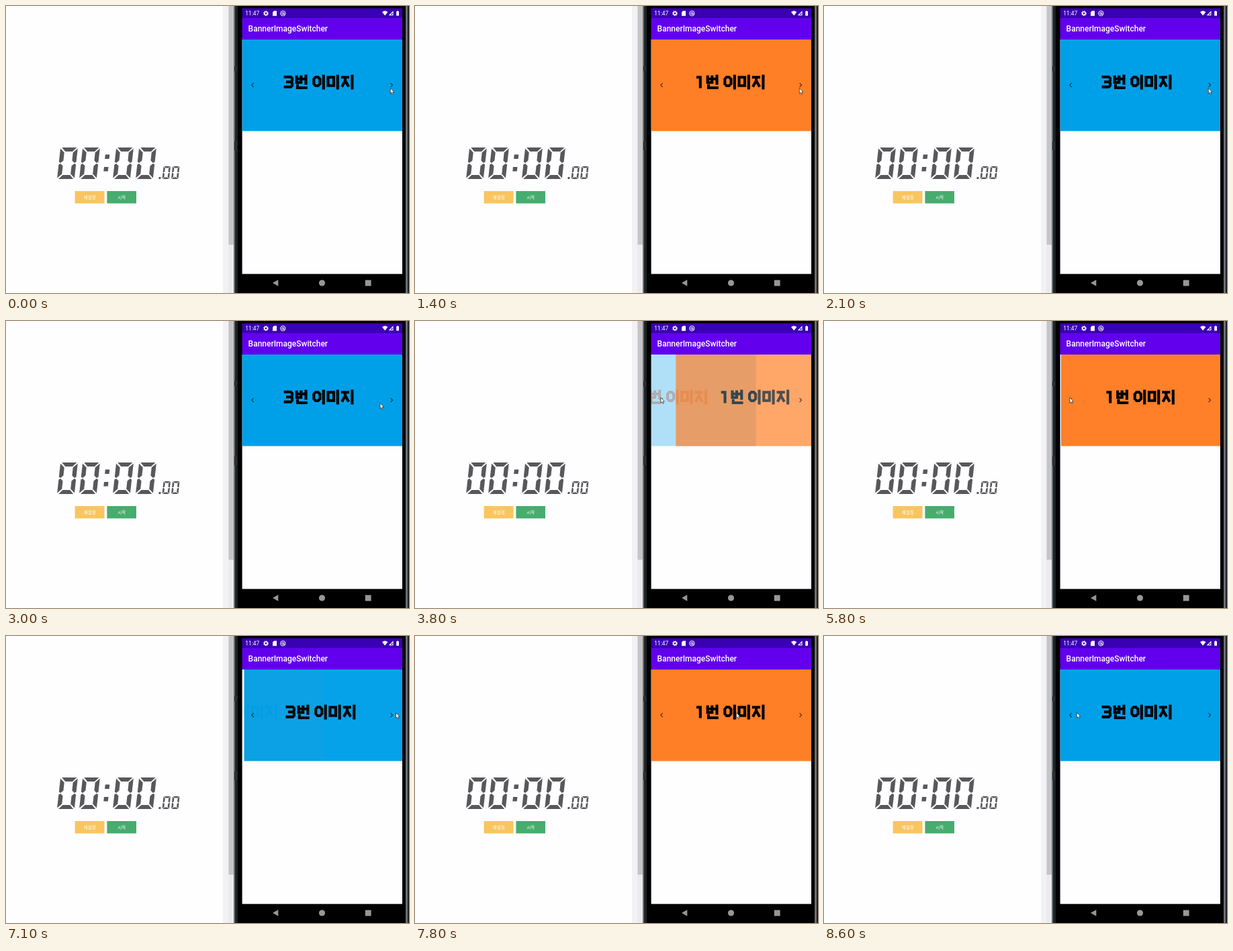
Recreate the animation shown at these times as an HTML page. Size 600 by 428 pixels, loop 8700 ms.

```html
<!DOCTYPE html>
<html lang="ko">
<head>
<meta charset="utf-8">
<title>Banner switcher</title>
<style>
  html, body { margin: 0; width: 100%; height: 100%; overflow: hidden; background: #fefdff; }
  svg { display: block; width: 600px; height: 428px; }
  .ui { font-family: Roboto, "Noto Sans", sans-serif; fill: #fff; }
  .ko { font-family: "Noto Sans CJK KR", "Noto Sans CJK", sans-serif; font-size: 6.5px; fill: #fff; text-anchor: middle; }
  .letters { fill: none; stroke: #000; stroke-width: 4.1; }
  .chevron { fill: none; stroke: #000; stroke-opacity: .6; stroke-width: 1.2; }
</style>
</head>
<body>
<svg viewBox="0 0 600 428">
  <defs>
    <clipPath id="frame"><rect x="351.6" y="50" width="238.4" height="136.4"/></clipPath>
    <g id="zero">
      <path d="M2 0H23.5L18 6H7.5Z"/>
      <path d="M0 1.5L6.2 7.5V19.5L2.5 23L0 21.5Z"/>
      <path d="M25 1.5L18.8 7.5V19.5L22.5 23L25 21.5Z"/>
      <path d="M0 25.5L2.5 24L6.2 27.5V39.5L0 45.5Z"/>
      <path d="M25 25.5L22.5 24L18.8 27.5V39.5L25 45.5Z"/>
      <path d="M2 47H23.5L18 41H7.5Z"/>
    </g>
    <!-- the word shared by every banner -->
    <path id="word" d="M19.7 1.5V12H26.3V1.5M19.7 6.8H26.3M26.3 6.8H33.5M33.5 .5V15.5M21 14.5V20H35.8
      M48 4H51.5L54.5 7V14L51.5 17H48L45.3 14V7ZM59.8 .5V22.5
      M66.5 4.3H75V16.7H66.5ZM80.8 .5V22.5
      M85.8 4.3H98M92 4.3V9.5L87 18.5M92 9.5L97.2 18.5M102.4 .5V22.5"/>
  </defs>

  <!-- stopwatch page -->
  <rect width="340" height="428" fill="#fefdff"/>
  <g id="clock" fill="#58575a"></g>
  <rect x="102.6" y="276" width="43.9" height="18.4" fill="#f9c55f"/>
  <rect x="150.4" y="276" width="43.6" height="18.4" fill="#46ad6e"/>
  <text class="ko" x="124.8" y="287.5">재설정</text>
  <text class="ko" x="172.3" y="287.5">시작</text>
  <rect x="323" width="8" height="428" fill="#f2f1f3"/>
  <rect x="331" width="9" height="428" fill="#ebeaec"/>
  <rect x="331.5" width="7.5" height="356" fill="#c5c4c7"/>

  <!-- phone -->
  <rect x="339" width="261" height="428" fill="#000"/>
  <rect x="339" width="2" height="428" fill="#6c6f72"/>
  <rect x="341" width="4" height="428" fill="#1d2225"/>
  <rect x="595" width="3" height="428" fill="#6c6f72"/>
  <rect x="598" width="2" height="428" fill="#1d2225"/>
  <rect x="340" y="90" width="4" height="7" fill="#2c3033"/>
  <rect x="340" y="202" width="4" height="13" fill="#2c3033"/>
  <rect x="351.6" y="3.4" width="238.4" height="14.6" fill="#3a00b3"/>
  <rect x="351.6" y="18" width="238.4" height="32" fill="#6200ee"/>
  <rect x="351.6" y="50" width="238.4" height="349.6" fill="#fefdff"/>

  <text class="ui" x="356.3" y="14" font-size="8.4">11:47</text>
  <text class="ui" x="360.6" y="38.3" font-size="12" font-weight="500">BannerImageSwitcher</text>
  <g fill="none" stroke="#fff">
    <circle cx="387" cy="11" r="2.2" stroke-width="1.6"/>
    <circle cx="387" cy="11" r="3.3" stroke-width="1.2" stroke-dasharray="1.3 1.29"/>
    <circle cx="412.3" cy="11" r="3.7" stroke-width="1"/>
    <circle cx="412.3" cy="11" r="1.6" stroke-width="1"/>
    <path d="M412.3 11L415 13.5" stroke-width="1"/>
  </g>
  <g fill="#fff">
    <path d="M399 7.3H403V14.7H397V9.3Z"/>
    <path d="M560 9Q564.2 5.6 568.4 9L564.2 14.3Z"/>
    <path d="M569.8 14H576.5V7.3ZM572.4 13H575.4V10Z" fill-rule="evenodd"/>
    <path d="M581.2 8H582.2V7.2H584V8H585V14.4H581.2Z"/>
  </g>
  <g fill="#979799">
    <path d="M397 413L405.3 408.3V417.7Z"/>
    <circle cx="470.5" cy="413" r="4.6"/>
    <rect x="534.8" y="408.7" width="8.8" height="8.8"/>
  </g>

  <g clip-path="url(#frame)">
    <g id="blue">
      <rect x="351.6" y="50" width="238.4" height="137" fill="#00a0e9"/>
      <g class="letters" transform="translate(413 102)" role="img" aria-label="3번 이미지">
        <path d="M.6 3.8H11L13 5.8V9.4L11.2 11.2L13 13V16.6L11 18.6H.6M4 11.2H11.5"/><use href="#word"/>
      </g>
    </g>
    <g id="orange">
      <rect x="351.6" y="50" width="238.4" height="137" fill="#ff7f27"/>
      <g class="letters" transform="translate(416 102)" role="img" aria-label="1번 이미지">
        <path d="M3 4.2H8.8V20.6"/><use href="#word"/>
      </g>
    </g>
  </g>
  <path class="chevron" d="M368.7 115L365.7 118L368.7 121"/>
  <path class="chevron" d="M572.6 115L575.6 118L572.6 121"/>
  <path id="cursor" d="M0 0V8L1.8 6.5L3.1 9.3L4.5 8.7L3.3 6H5.6Z" fill="#fff" stroke="#222" stroke-width=".7"/>
</svg>
<script>
const LOOP = 8700, TICK = 100, SLIDE = 400, SHIFT = 119;
const $ = id => document.getElementById(id);

// [start, banner that comes in]
const slides = [
  [250, 'orange'], [1500, 'blue'], [3550, 'orange'], [4433, 'blue'],
  [5428, 'orange'], [6740, 'blue'], [7300, 'orange'], [8120, 'blue']
];

// [time, x, y] of the pointer tip
const pointer = [
  [0, 572.3, 122.5], [2700, 572.3, 122.5], [3000, 557, 122.5], [3500, 365.8, 114],
  [5800, 365.8, 114], [6400, 572, 115], [7100, 580.5, 114.5], [7500, 580.5, 114.5],
  [8100, 376.3, 114], [LOOP, 376.3, 114]
];

function buildClock() {
  const zero = (x, y, s) =>
    `<use href="#zero" transform="translate(${x} ${y}) scale(${s}) matrix(1.03 0 -.11 1 5.2 0)"/>`;
  const big = [76, 109, 159, 193].map(x => zero(x, 211, 1));
  const small = [232.5, 246].map(x => zero(x, 239, .405));
  $('clock').innerHTML = big.concat(small).join('') +
    '<path d="M147.8 221.5h6.5l-.7 6.5h-6.5zM146 240h6.5l-.7 6.5h-6.5zM227.6 255h3l-.3 3h-3z"/>';
}

const ease = p => (1 - Math.cos(Math.PI * p)) / 2;

function place(id, x, alpha) {
  $(id).setAttribute('transform', `translate(${x} 0)`);
  $(id).setAttribute('opacity', alpha);
}

function drawBanner(t) {
  const [start, next] = slides.filter(s => s[0] <= t).pop() || [-SLIDE, 'blue'];
  const p = ease(Math.min(1, (t - start) / SLIDE));
  place(next, SHIFT * (1 - p), p);
  place(next === 'blue' ? 'orange' : 'blue', -SHIFT * p, 1 - p);
}

function drawPointer(t) {
  const i = pointer.findIndex(k => k[0] > t);
  const [t0, x0, y0] = pointer[i - 1], [t1, x1, y1] = pointer[i];
  const p = (t - t0) / (t1 - t0);
  $('cursor').setAttribute('transform', `translate(${x0 + (x1 - x0) * p} ${y0 + (y1 - y0) * p})`);
}

function draw(now) {
  const t = Math.floor((now % LOOP) / TICK) * TICK;
  drawBanner(t);
  drawPointer(t);
}

buildClock();
draw(0);
const begin = performance.now();
(function loop() {
  draw(performance.now() - begin);
  requestAnimationFrame(loop);
})();
</script>
</body>
</html>
```
